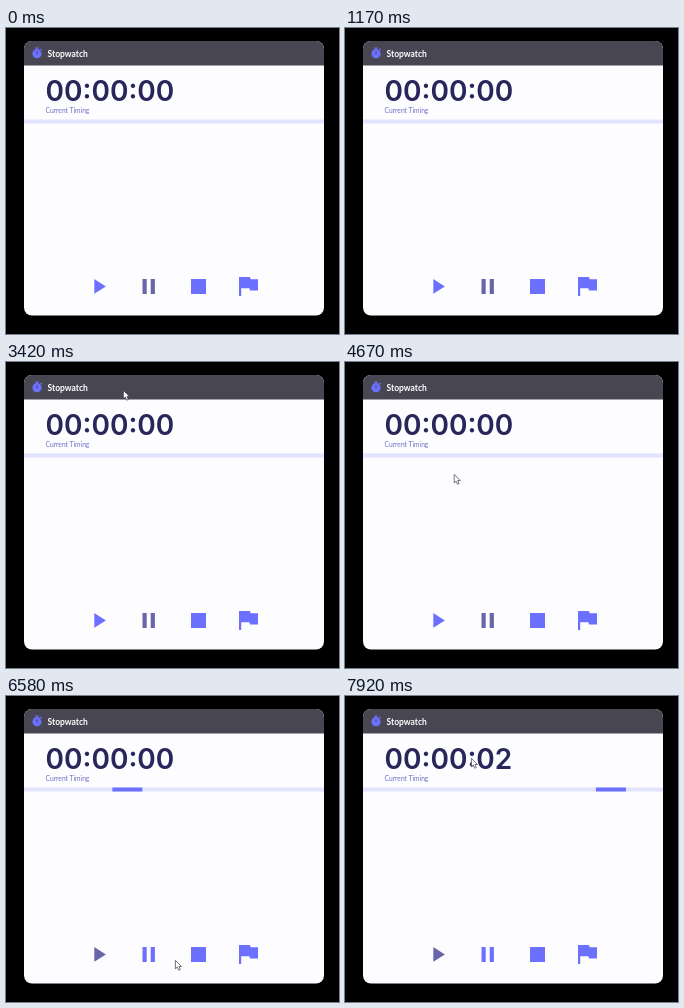
An HTML page that plays this animation: 333x306 px, repeating every 8 s.

```html
<!DOCTYPE html>
<html lang="en">
<head>
<meta charset="utf-8">
<title>Stopwatch</title>
<style>
  html, body { margin: 0; width: 100%; height: 100%; overflow: hidden; background: #000; }
  svg { display: block; width: 333px; height: 306px; }
  .title { font: 700 8.5px Lato, sans-serif; fill: #fff; }
  .time { font: 600 28px Inter, sans-serif; fill: #28265a; }
  .label { font: 400 6.7px Lato, sans-serif; fill: #706fc5; }
  .accent { fill: #6c70ff; }
  .header { fill: #484653; }
</style>
</head>
<body>
<svg viewBox="0 0 333 306">
  <defs>
    <clipPath id="window"><rect x="18" y="13" width="300" height="274.5" rx="8"/></clipPath>
  </defs>
  <g clip-path="url(#window)">
    <rect x="18" y="13" width="300" height="275" fill="#fdfdff"/>
    <rect class="header" x="18" y="13" width="300" height="24.5"/>
    <g class="accent">
      <circle cx="31" cy="25.7" r="4.6"/>
      <path d="M29.3 19.5h3.4v1.3h-3.4zM34 21.6l1-1 1.1 1.1-1 1z"/>
      <rect class="header" x="30.5" y="23.2" width="1" height="3"/>
    </g>
    <text class="title" x="41.6" y="28.6">Stopwatch</text>
    <text class="time" id="time" x="39.6" y="72.5">00:00:00</text>
    <text class="label" x="39.5" y="84.8">Current Timing</text>
    <rect x="18" y="91.5" width="300" height="4" fill="#e2e3ff"/>
    <rect class="accent" id="bar" y="91.5" width="30" height="4"/>
    <path id="play" d="M88.3 251l11.6 7.4-11.6 7.4z"/>
    <path id="pause" d="M136.5 251h4.2v15h-4.2zM144.7 251h4.2v15h-4.2z"/>
    <path class="accent" d="M185 251h15v15h-15z"/>
    <path class="accent" d="M233 249h11l.6 2.2h7.4v11.3h-8l-.6-2.2h-8.2v7.7H233z"/>
  </g>
  <path id="cursor" d="M.4.4v8.4l1.9-1.7 1.4 3.1 1.6-.7-1.4-3h2.6z"
        fill="#fff" stroke="#3a3850" stroke-width=".7" stroke-linejoin="round"/>
</svg>
<script>
const LOOP = 8000;
const CLOCK_START = 5750;
const ACTIVE = '#6c70ff', DISABLED = '#6866a8';
const bounce = { start: 6012, left: -12, range: 330, speed: 0.208 };

const entry = { x: 270, y: 73 };
const playButton = { x: 94, y: 264 };
const moves = [
  { start: 1540, end: 1830, x: 140, y: 247 },
  { start: 1920, end: 2330, ...playButton },
  { start: 2500, end: 3250, x: 117, y: 28 },
  { start: 4590, end: 5000, ...playButton },
  { start: 5665, end: 6000, x: 169, y: 264 },
  { start: 6840, end: 7300, x: 69, y: 66 },
  { start: 7300, end: 7920, x: 126, y: 62 }
];

const [time, bar, play, pause, cursor] =
  ['time', 'bar', 'play', 'pause', 'cursor'].map(id => document.getElementById(id));

const clamp = u => Math.min(1, Math.max(0, u));
const easeOut = u => 1 - (1 - u) ** 2;
const show = (node, visible) => { node.style.visibility = visible ? 'visible' : 'hidden'; };

function cursorAt(t) {
  return moves.reduce((from, to) => {
    const e = easeOut(clamp((t - to.start) / (to.end - to.start)));
    return { x: from.x + (to.x - from.x) * e, y: from.y + (to.y - from.y) * e };
  }, entry);
}

function barAt(t) {
  const { start, left, range, speed } = bounce;
  const travel = Math.max(0, t - start) * speed % (2 * range);
  return left + range - Math.abs(range - travel);
}

function draw(t) {
  const running = t >= CLOCK_START;
  const seconds = running ? Math.floor((t - CLOCK_START) / 1000) : 0;
  time.textContent = '00:00:' + String(seconds).padStart(2, '0');
  play.setAttribute('fill', running ? DISABLED : ACTIVE);
  pause.setAttribute('fill', running ? ACTIVE : DISABLED);
  bar.setAttribute('x', barAt(t));
  show(bar, t >= bounce.start);
  const { x, y } = cursorAt(t);
  cursor.setAttribute('transform', `translate(${x} ${y})`);
  show(cursor, t >= moves[0].start);
}

const begin = performance.now();
function tick() {
  draw((performance.now() - begin) % LOOP);
  requestAnimationFrame(tick);
}
tick();
</script>
</body>
</html>
```
